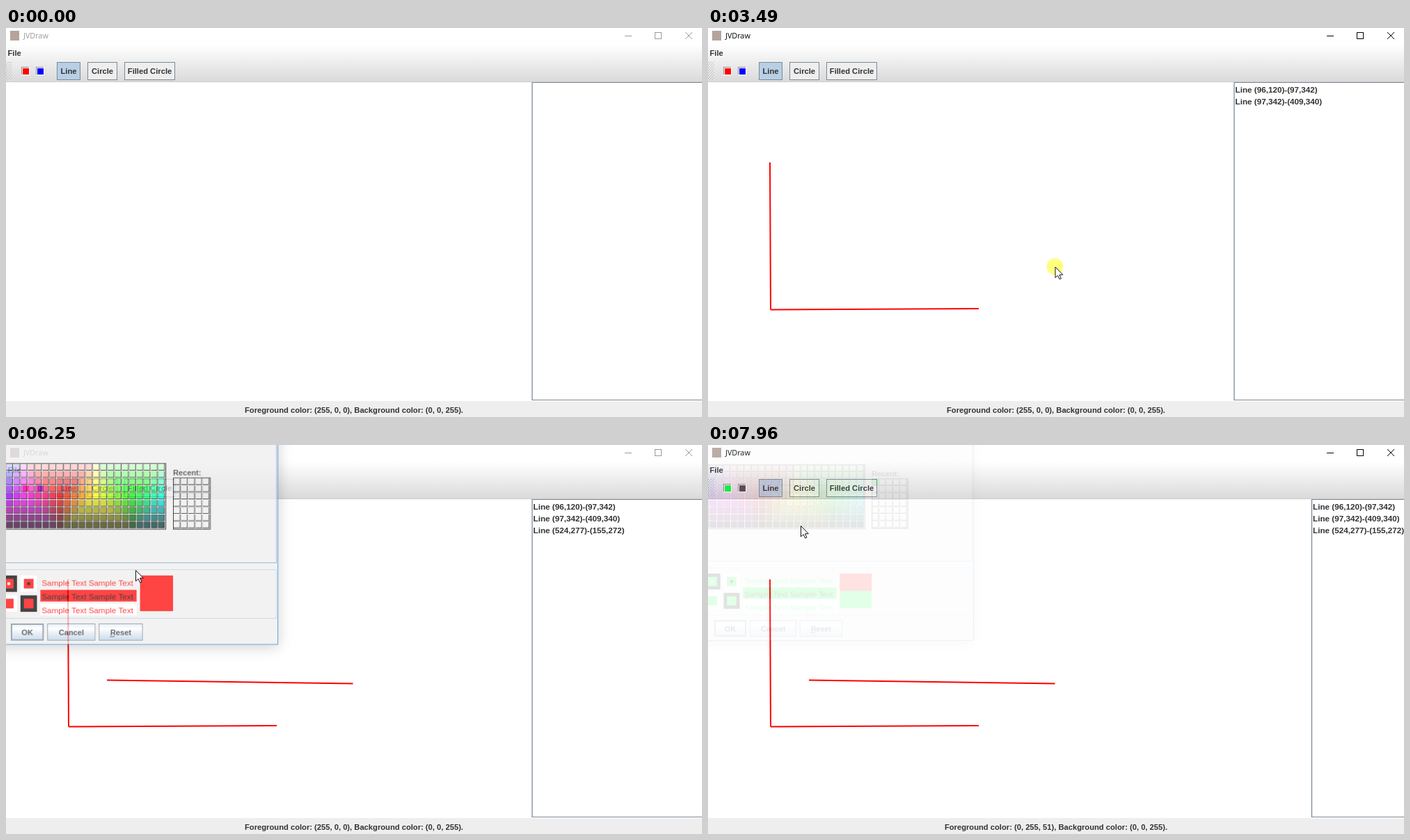
Write an HTML page with a canvas that moves like this. It is 1000 by 560 pixels and loops after 8 s.

```html
<!DOCTYPE html>
<html lang="en">
<head>
<meta charset="utf-8">
<title>JVDraw</title>
<style>
  html, body { margin: 0; width: 100%; height: 100%; overflow: hidden; background: #fff; }
  canvas { display: block; width: 100vw; height: 100vh; }
</style>
</head>
<body>
<canvas id="stage" width="1000" height="560"></canvas>
<script>
const LOOP = 8000, HOLD = 100, PAD = 30;
const BOLD = 'bold 11.2px "Liberation Sans", Arial, sans-serif';
const LIST = 'bold 11.7px "Liberation Sans", Arial, sans-serif';
const PLAIN = '11.8px "Liberation Sans", Arial, sans-serif';
const TITLE = '10.8px "Open Sans", "Noto Sans", sans-serif';
const STEEL = '#7a8a99', SKY = '#b8cfe5', PANEL = '#eee', INK = '#333';
const RED = '#ff0000', GREEN = '#00ff33';

const stage = document.getElementById('stage').getContext('2d');
const layerCanvas = document.createElement('canvas');
layerCanvas.width = 500;
layerCanvas.height = 400;
const layer = layerCanvas.getContext('2d');
layer.translate(PAD, PAD);
let g = stage;

const spot = {
  entry: [330, 488], shelf: [76, 405],
  top: [89, 193.5], corner: [90, 405.5], right: [389, 404],
  farRight: [498.5, 343.5], farLeft: [145, 338.5],
  belowTools: [108, 141], circleTool: [120, 62], foreground: [33, 65],
  center: [186, 180], green: [196, 76], belowOk: [60, 309], ok: [30, 272], rest: [133, 116]
};
const move = (start, end, to, bow = 0) => ({ start, end, to, bow });
const moves = [
  move(300, 870, spot.shelf), move(940, 1130, spot.top),
  move(1480, 1940, spot.corner, -8), move(2670, 3050, spot.right),
  move(3150, 3370, spot.farRight), move(3570, 3930, spot.farLeft),
  move(4020, 4260, spot.belowTools), move(4300, 4710, spot.circleTool),
  move(4930, 5360, spot.foreground), move(5770, 6250, spot.center),
  move(6250, 6760, spot.green), move(6940, 7200, spot.belowOk),
  move(7200, 7390, spot.ok), move(7540, 7960, spot.rest)
];
const lines = [
  { start: 1440, end: 2130, from: spot.top, to: spot.corner, label: 'Line (96,120)-(97,342)' },
  { start: 2600, end: 3060, from: spot.corner, to: spot.right, label: 'Line (97,342)-(409,340)' },
  { start: 3490, end: 3940, from: spot.farRight, to: spot.farLeft, label: 'Line (524,277)-(155,272)' }
];
const pick = 6790, confirm = 7440;
const presses = [...lines.flatMap(l => [l.start, l.end]), 5540, pick, confirm];

const clamp = (v, lo, hi) => Math.max(lo, Math.min(hi, v));
const ramp = (t, a, b) => clamp((t - a) / (b - a), 0, 1);
const smooth = u => u * u * (3 - 2 * u);

function cursorAt(t) {
  let [x, y] = spot.entry;
  for (const m of moves) {
    const u = smooth(ramp(t, m.start, m.end));
    x += (m.to[0] - x) * u + m.bow * Math.sin(Math.PI * u);
    y += (m.to[1] - y) * u;
  }
  return [x, y];
}

function rect(x, y, w, h, color) {
  g.fillStyle = color;
  g.fillRect(x, y, w, h);
}
function frame(x, y, w, h, color) {
  g.strokeStyle = color;
  g.lineWidth = 1;
  g.strokeRect(x + .5, y + .5, w - 1, h - 1);
}
function line(x0, y0, x1, y1, color, width = 1) {
  g.strokeStyle = color;
  g.lineWidth = width;
  g.beginPath();
  g.moveTo(x0, y0);
  g.lineTo(x1, y1);
  g.stroke();
}
function text(s, x, y, font = BOLD, color = INK, align = 'left') {
  g.font = font;
  g.fillStyle = color;
  g.textAlign = align;
  g.fillText(s, x, y);
}
function vertical(y, h, stops) {
  const fill = g.createLinearGradient(0, y, 0, y + h);
  for (const at in stops) fill.addColorStop(+at, stops[at]);
  return fill;
}
const glossy = (y, h) => vertical(y, h, { 0: '#dde8f3', .3: '#fff', .6: '#dde8f3', 1: SKY });

function button(x, y, w, h, label, fill) {
  rect(x, y, w, h, fill);
  frame(x, y, w, h, STEEL);
  text(label, x + w / 2, y + 17.3, BOLD, INK, 'center');
}

function colorButton(x, color) {
  rect(x, 56, 12, 12, '#fff');
  frame(x, 56, 11, 11, '#8c8c8c');
  rect(x + 1, 57, 11, 11, '#fff');
  rect(x + 2, 58, 9, 9, color);
}

function drawWindow(t, applied) {
  const active = t >= 90 && t < 6110 || t >= 7790;
  const chrome = active ? '#000' : '#999';
  rect(0, 0, 1000, 560, '#fff');
  rect(6, 4, 13, 14, '#b5a49c');
  text('JVDraw', 25, 15, TITLE, chrome);
  line(889, 11.5, 899, 11.5, chrome);
  frame(932, 6, 10, 10, chrome);
  line(976, 6, 986, 16, chrome);
  line(986, 6, 976, 16, chrome);

  rect(0, 24, 1000, 54, vertical(24, 53, { 0: '#fff', 1: '#dadada' }));
  line(0, 77.5, 1000, 77.5, '#ccc');
  text('File', 2.5, 40);
  for (let row = 0; row < 14; row++)
    for (let x = row % 2 * 1.9; x < 9; x += 3.8) {
      rect(x, 49 + row * 1.9, 1, 1, '#8f9aa5');
      rect(x + 1, 50 + row * 1.9, 1, 1, '#fff');
    }
  colorButton(22, applied ? GREEN : RED);
  colorButton(43, applied ? '#4a4e52' : '#0000ff');

  const [cx, cy] = cursorAt(t);
  const hover = cx > 117 && cx < 160 && cy > 49 && cy < 75;
  button(73, 49, 34, 26, 'Line', SKY);
  button(117, 49, 43, 26, 'Circle', hover ? glossy(49, 26) : PANEL);
  button(170, 49, 73, 26, 'Filled Circle', PANEL);

  const left = applied ? 867.5 : 756;
  line(left, 78.5, 1000, 78.5, STEEL);
  line(left, 78, left, 536, STEEL, 1.3);
  line(left, 535.5, 1000, 535.5, STEEL);
  lines.forEach((l, i) => {
    if (t >= l.end) text(l.label, left + 1.5, 93 + i * 17.2, LIST);
  });

  rect(0, 537, 1000, 23, PANEL);
  const rgb = applied ? '0, 255, 51' : '255, 0, 0';
  text(`Foreground color: (${rgb}), Background color: (0, 0, 255).`, 500, 554, BOLD, INK, 'center');
}

// The loose end trails slightly behind the cursor
function drawLines(t) {
  for (const l of lines)
    if (t >= l.start) line(...l.from, ...(t < l.end ? cursorAt(t - 14) : l.to), RED, 2);
}

// Each row walks the hue ring cyan, magenta, yellow, cyan in ten columns per side
function swatchColor(col, row) {
  if (col === 0) return `hsl(0 0% ${100 - 10 * row}%)`;
  const lo = Math.max(0, 204 - 51 * row);
  const hi = Math.min(255, 255 - 51 * (row - 4));
  const side = Math.floor((col - 1) / 10), step = (col - 1) % 10;
  const level = distance => clamp(255 - 51 * distance, lo, hi);
  const falling = level(step), rising = level(10 - step);
  return `rgb(${[[rising, falling, hi], [hi, rising, falling], [falling, hi, rising]][side]})`;
}

function grid(x, y, cols, rows, colorOf) {
  const pitch = 10.53;
  rect(x - 1, y - 1, cols * pitch + 2, rows * pitch + 2, '#000');
  rect(x, y, cols * pitch, rows * pitch, '#fff');
  for (let r = 0; r < rows; r++)
    for (let c = 0; c < cols; c++) {
      rect(x + c * pitch, y + r * pitch, 9.6, 9.6, '#000');
      rect(x + c * pitch, y + r * pitch, 8.7, 8.7, colorOf(c, r));
    }
}

function nested(x, y, ...colors) {
  colors.forEach((color, i) => rect(x + 5 * i, y + 5 * i, 24 - 10 * i, 24 - 10 * i, color));
}

function drawDialog(picked) {
  const color = picked ? GREEN : RED;
  g.save();
  g.shadowColor = 'rgba(0,0,0,.26)';
  g.shadowBlur = 20;
  g.shadowOffsetY = 3;
  rect(-237, -104, 632, 394, PANEL);
  g.restore();
  frame(-237, -104, 632, 394, '#2f86d3');
  line(392.5, -PAD, 392.5, 171, '#7f9fc4');
  line(-PAD, 170.5, 393, 170.5, '#7f9fc4');

  grid(231 - 31 * 10.53, 26.3, 31, 9, swatchColor);
  text('Recent:', 242, 43);
  grid(243, 47.3, 5, 7, (c, r) => picked && c + r === 0 ? GREEN : PANEL);

  frame(-230, 180, 623, 72, SKY);
  nested(-9, 189, '#000', color, '#fff');
  nested(20, 189, '#fff', color, '#000');
  nested(-9, 218, '#fff', color);
  nested(20, 218, '#000', color);
  rect(49, 210, 140, 17, color);
  rect(49, 230, 140, 17, '#fff');
  [color, '#000', color].forEach((ink, i) =>
    text('Sample Text Sample Text', 51, 203.5 + 20 * i, PLAIN, ink));
  rect(194, 189, 48, 52, color);
  rect(194, 189, 48, 26, RED);

  button(6, 259, 48, 25, 'OK', glossy(259, 25));
  frame(7, 260, 46, 23, STEEL);
  button(59, 259, 70, 25, 'Cancel', glossy(259, 25));
  button(134, 259, 64, 25, 'Reset', glossy(259, 25));
  line(150, 278, 157, 278, INK);
}

// Fades and grows together around the dialog's own centre
function showDialog(t) {
  const shown = ramp(t, 6130, 6295) * (1 - ramp(t, 7780, 7984));
  if (!shown) return;
  g = layer;
  g.clearRect(-PAD, -PAD, 500, 400);
  drawDialog(t >= pick);
  g = stage;
  const scale = .953 + .047 * shown, cx = 79, cy = 93;
  g.save();
  g.globalAlpha = shown;
  g.translate(cx, cy);
  g.scale(scale, scale);
  g.drawImage(layerCanvas, -cx - PAD, -cy - PAD);
  g.restore();
}

const arrow = new Path2D('M0 0V15.5L3.6 12.2L6.1 17.6L8.4 16.6L6 11.2H10.8Z');

function drawPointer(t) {
  if (t < moves[0].start) return;
  const [x, y] = cursorAt(t);
  if (presses.some(at => t >= at && t < at + HOLD)) {
    g.fillStyle = 'rgba(255,255,0,.5)';
    g.beginPath();
    g.arc(x, y, 12, 0, Math.PI * 2);
    g.fill();
  }
  g.save();
  g.translate(x + .5, y + .5);
  g.fillStyle = '#fff';
  g.fill(arrow);
  g.strokeStyle = '#111';
  g.lineWidth = 1;
  g.stroke(arrow);
  g.restore();
}

function draw(t) {
  drawWindow(t, t >= 7830);
  drawLines(t);
  showDialog(t);
  drawPointer(t);
}

const begin = performance.now();
function tick() {
  draw((performance.now() - begin) % LOOP);
  requestAnimationFrame(tick);
}
tick();
</script>
</body>
</html>
```
